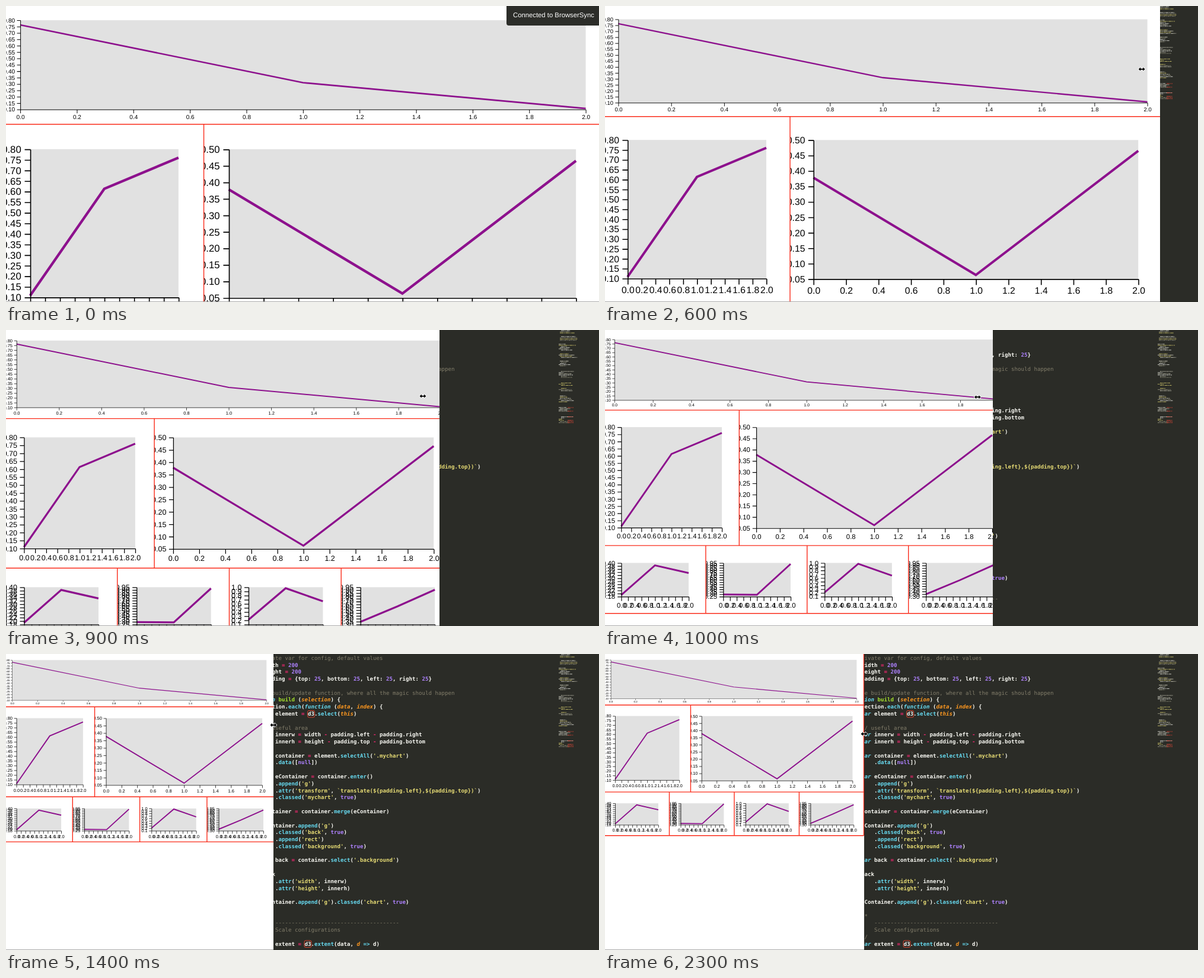
An HTML page that plays this animation: 1000 by 500 pixels, repeating every 3300 ms.

```html
<!DOCTYPE html>
<html lang="en">
<head>
<meta charset="utf-8">
<title>Responsive charts</title>
<style>
html, body { margin: 0; width: 100%; height: 100%; overflow: hidden; background: #2b2c27; }
#stage { position: relative; width: 1000px; height: 500px; overflow: hidden; background: #2b2c27; }
/* Set at double size and halved, so that lines may sit on half pixels */
#code {
  position: absolute; left: 387.8px; top: .6px; margin: 0; white-space: pre; color: #f8f8f2;
  transform: scale(.5); transform-origin: 0 0;
  font: bold 18.272px/23.56px "DejaVu Sans Mono", monospace; text-rendering: geometricPrecision;
}
#code i { font-style: normal; }
#code .note { color: #827d6a; font-weight: normal; }
#code .str { color: #e6db74; }
#code .num { color: #ae81ff; }
#code .op { color: #f92672; }
#code .key { color: #66d9ef; font-style: italic; }
#code .call { color: #66d9ef; }
#code .name { color: #a6e22e; }
#code .arg { color: #fd971f; font-style: italic; }
#code .lint { border-radius: 5px; box-shadow: 0 0 0 2px #d0402c; }
#map, #page, #page > svg, #pointer { position: absolute; left: 0; top: 0; }
#page { height: 500px; overflow: hidden; background: #fff; }
#page::after { content: ""; position: absolute; left: 0; bottom: 0; width: 100%; height: 1px; background: #aaa; }
#page text { font: 10px "Liberation Sans", Arial, sans-serif; text-rendering: geometricPrecision; }
#toast {
  position: absolute; left: 844px; top: 0; width: 156px; height: 33px; border-bottom-left-radius: 4px;
  background: #2c2d29; color: #fff; text-indent: 11px; white-space: nowrap;
  font: 11.3px/32px "Liberation Sans", Arial, sans-serif; text-rendering: geometricPrecision;
}
</style>
</head>
<body>
<div id="stage">
<pre id="code"></pre>
<svg id="map" width="1000" height="500"></svg>
<div id="page"><svg id="charts" width="1010" height="500"></svg></div>
<div id="toast">Connected to BrowserSync</div>
<svg id="pointer" width="1000" height="500">
  <path id="arrows" d="M-5.5 0L-2-3.2V-1H2V-3.2L5.5 0L2 3.2V1H-2V3.2Z" stroke="#fff" stroke-width="1.6" paint-order="stroke" stroke-linejoin="round"/>
</svg>
</div>
<script>
const $ = id => document.getElementById(id);

function add(parent, tag, attrs = {}, text) {
  const el = document.createElementNS('http://www.w3.org/2000/svg', tag);
  for (const key in attrs) el.setAttribute(key, attrs[key]);
  if (text !== undefined) el.textContent = text;
  parent.appendChild(el);
  return el;
}

// ---- Editor ----
const source = `
    // private var for config, default values
    var width = 200
    var height = 200
    var padding = {top: 25, bottom: 25, left: 25, right: 25}

    // the build/update function, where all the magic should happen
    function build (selection) {
      selection.each(function (data, index) {
        var element = d3.select(this)

        // useful area
        var innerw = width - padding.left - padding.right
        var innerh = height - padding.top - padding.bottom

        var container = element.selectAll('.mychart')
            .data([null])

        var eContainer = container.enter()
            .append('g')
            .attr('transform', \`translate(\${padding.left},\${padding.top})\`)
            .classed('mychart', true)

        container = container.merge(eContainer)

        eContainer.append('g')
            .classed('back', true)
            .append('rect')
            .classed('background', true)

        var back = container.select('.background')

        back
            .attr('width', innerw)
            .attr('height', innerh)

        eContainer.append('g').classed('chart', true)

        /*
            --------------------------------------
            Scale configurations
        */
        var extent = d3.extent(data, d => d)`.slice(1);

const rules = [
  ['note', /\/\/.*|\/\*[^]*?\*\//],
  ['str', /'[^']*'|`[^`]*`/],
  ['key', /\b(?:var|function)\b|=>/],
  ['arg', /\bselection(?=\) \{)|\bdata(?=, index)|\bindex\b|\bd(?= =>)|\bthis\b/],
  ['name', /\bbuild\b/],
  ['lint', /\bd3\b/],
  ['call', /\b\w+(?=\()/],
  ['num', /\b(?:\d+|true|null)\b/],
  ['op', / [=-](?= )/]
];
const lexer = new RegExp(rules.map(r => '(' + r[1].source + ')').join('|'), 'g');
const escapeText = s => s.replace(/&/g, '&amp;').replace(/</g, '&lt;').replace(/>/g, '&gt;');
let html = '', last = 0;
for (const m of source.matchAll(lexer)) {
  const kind = rules[m.slice(1).findIndex(g => g !== undefined)][0];
  html += escapeText(source.slice(last, m.index)) + `<i class="${kind}">${escapeText(m[0])}</i>`;
  last = m.index + m[0].length;
}
$('code').innerHTML = html + escapeText(source.slice(last));

// Minimap: paragraphs of tiny lines, narrower and redder further down
let seed = 7;
const random = () => (seed = seed * 16807 % 2147483647) / 2147483647;
const tints = ['#f8f8f2', '#e9e6d2', '#e6db74', '#a9a68f'];

function mapLine(x, y, width, stroke) {
  add($('map'), 'path', {
    d: `M${x} ${y}h${width}`, stroke, 'stroke-opacity': .75,
    'stroke-dasharray': `${2 + random() * 5} .8 1.6 1`
  });
}

for (let y = 1; y < 162; y += 3 + random() * 5) {
  const lines = 3 + Math.floor(random() * 4);
  for (let i = 0; i < lines && y < 162; i++, y += 2) {
    const x = 932 + Math.floor(random() * 3) * 2;
    mapLine(x, y, (36 - y * .09) * (.25 + .65 * random()), tints[Math.floor(random() * tints.length)]);
    if (y > 128 && random() > .4) mapLine(947, y, 10, '#f04838');
  }
}

// ---- Charts: size, y range and step, decimals, three values ----
function chart(w, h, lo, hi, step, digits, values) {
  const svg = add($('charts'), 'svg', { viewBox: `0 0 ${w} ${h}`, preserveAspectRatio: 'none' });
  const g = add(svg, 'g', { transform: 'translate(25,25)' });
  const iw = w - 50, ih = h - 50;
  const yOf = v => ih * (hi - v) / (hi - lo);
  add(g, 'rect', { width: iw, height: ih, fill: '#e1e1e1' });
  add(g, 'polyline', {
    points: values.map((v, i) => `${iw * i / 2},${yOf(v)}`).join(' '),
    fill: 'none', stroke: '#8d118d', 'stroke-width': 2.6
  });
  let ticks = `M.5 .5V${ih + .5}H${iw + .5}`;
  for (let i = 0; i <= 10; i++) {
    const x = iw * i / 10 + .5;
    ticks += `M${x} ${ih + .5}v6`;
    add(g, 'text', { x, y: ih + 9, dy: '.71em', 'text-anchor': 'middle' }, (i / 5).toFixed(1));
  }
  const count = Math.round((hi - lo) / step);
  for (let i = 0; i <= count; i++) {
    const v = lo + i * step, y = yOf(v) + .5;
    ticks += `M.5 ${y}h-6`;
    add(g, 'text', { x: -9, y, dy: '.32em', 'text-anchor': 'end' }, v.toFixed(digits));
  }
  add(g, 'path', { d: ticks, fill: 'none', stroke: '#000' });
  return svg;
}

const wideChart = chart(1000, 200, .1, .8, .05, 2, [.763, .31, .107]);
const leftChart = chart(200, 200, .1, .8, .05, 2, [.108, .613, .76]);
const rightChart = chart(400, 200, .05, .5, .05, 2, [.378, .063, .465]);
const smallCharts = [
  chart(150, 100, .18, .4, .02, 2, [.19, .384, .334]),
  chart(150, 100, .25, .95, .05, 2, [.293, .287, .928]),
  chart(150, 100, .1, 1, .1, 1, [.21, .976, .66]),
  chart(150, 100, .3, .95, .05, 2, [.345, .615, .905])
];
const frame = add($('charts'), 'path', { fill: 'none', stroke: '#fa2c1b', 'stroke-width': 1.4 });

function place(el, x, y, width, height) {
  const box = { x, y, width, height };
  for (const key in box) el.setAttribute(key, box[key]);
}

// Three rows of cells share the width; all heights follow from it
function layout(size) {
  const unit = size / 600;
  const y1 = size / 5 - 1, top2 = y1 + .4;
  const y2 = top2 + 200 * unit + 1, top3 = y2 + .9;
  const y3 = top3 + 100 * unit;
  const split = size / 3 - 1;
  place(wideChart, -1, -1, size, size / 5);
  place(leftChart, -1, top2, split, 200 * unit - 1);
  place(rightChart, split + .3, top2, 400 * unit, 200 * unit);
  let d = `M0 ${y1}H${size}M0 ${y2}H${size}M0 ${y3}H${size}M${split} ${y1}V${y2}M${size + .2} 0V${y3}`;
  smallCharts.forEach((el, i) => {
    const x = size / 4 * i - 1 + .4 * i;
    place(el, i ? x + 1 : x, top3, 150 * unit, 100 * unit);
    if (i) d += `M${x} ${y2}V${y3}`;
  });
  frame.setAttribute('d', d);
}

// ---- Motion ----
const STEP = 100, LOOP = 3300, END = 2300;
const DRAG = 500, SETTLE = 1400, TOAST = 300;

// Time, chart width, pane width
const keys = [
  [0, 1003.7, 1004], [DRAG, 996.3, 1000], [800, 824.7, 808.5], [1000, 682, 654],
  [1200, 553.7, 535], [SETTLE, 451.6, 451], [END, 436.3, 437]
];

function pose(t) {
  const i = Math.max(1, keys.findIndex(key => key[0] >= t));
  const a = keys[i - 1], b = keys[i];
  const f = (t - a[0]) / (b[0] - a[0]);
  return a.map((v, j) => v + (b[j] - v) * f);
}

function draw(time) {
  const t = Math.min(time, END);
  const [, size, pane] = pose(t);
  const u = Math.min(1, Math.max(0, (t - DRAG) / (SETTLE - DRAG)));
  const lead = 31 * (1 - u ** 3);
  layout(size);
  $('page').style.width = pane + 'px';
  $('toast').style.display = t < TOAST ? '' : 'none';
  $('pointer').style.display = t < TOAST ? 'none' : '';
  $('arrows').setAttribute('transform', `translate(${pane - lead},${105 + (t - DRAG) / 60})`);
}

const start = performance.now();
let shown = -1;
function tick() {
  const time = Math.floor((performance.now() - start) % LOOP / STEP) * STEP;
  if (time !== shown) draw(shown = time);
  requestAnimationFrame(tick);
}
tick();
</script>
</body>
</html>
```
